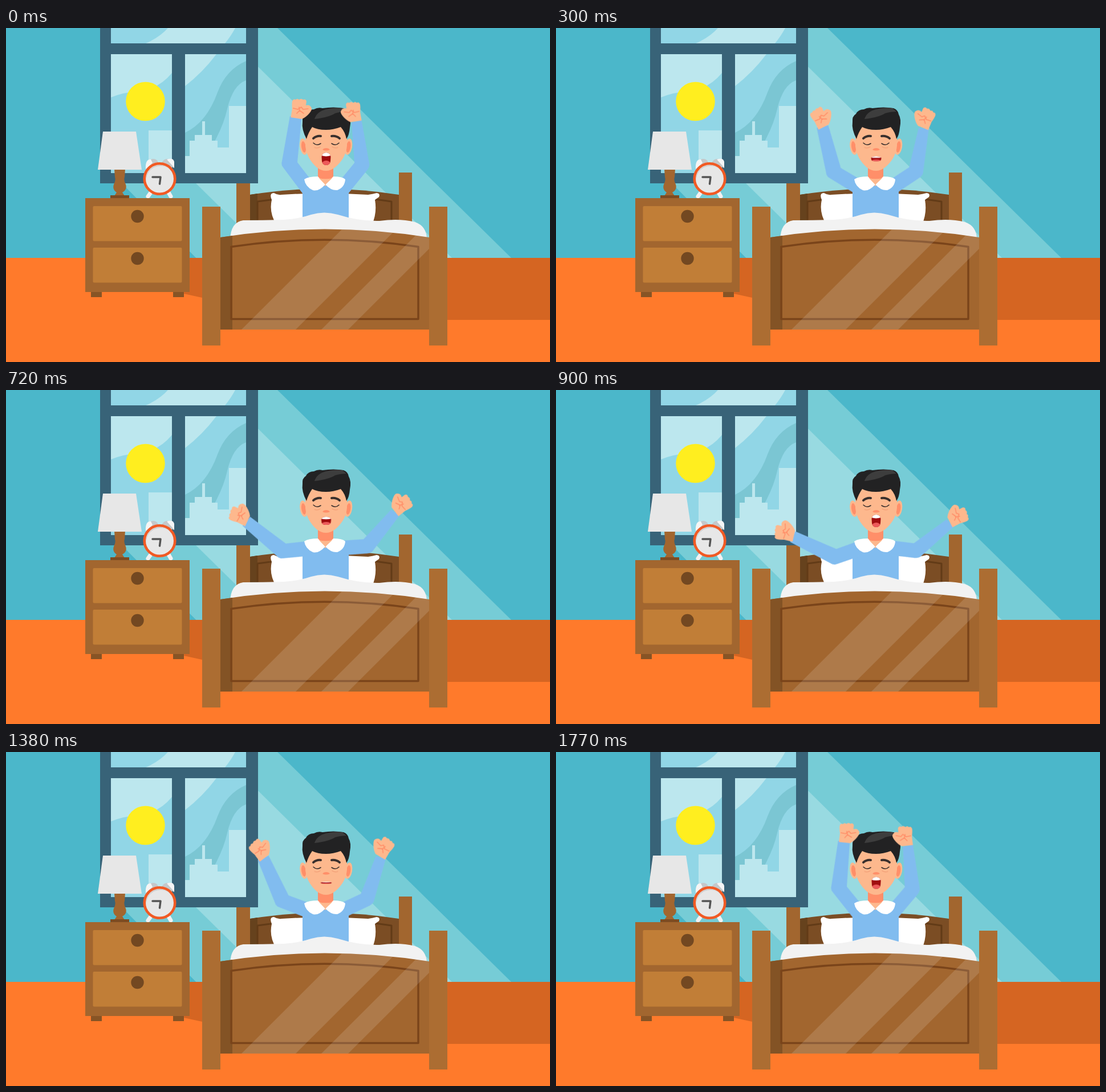
These frames come from a looping animation (954 by 587 pixels, 1800 ms). An HTML page:

```html
<!DOCTYPE html>
<html lang="en">
<head>
<meta charset="utf-8">
<title>Morning stretch</title>
<style>
  html, body { margin: 0; width: 100%; height: 100%; overflow: hidden; background: #4bb7ca; }
  svg { display: block; width: 100vw; height: 100vh; }

  .arm { animation: 900ms cubic-bezier(.3, .2, .7, .75) infinite alternate; }
  .left.arm { transform-origin: 531px 271px; animation-name: lower-left; }
  .right.arm { transform-origin: 590px 268px; animation-name: lower-right; }
  @keyframes lower-left { to { transform: rotate(-72.3deg); } }
  @keyframes lower-right { to { transform: rotate(58deg); } }

  .hand { transform-origin: 508px 157px; animation: bend 900ms linear infinite alternate; }
  @keyframes bend { 33%, 100% { transform: rotate(-14deg); } }

  .mouth { transform-origin: 561.5px 230px; animation: yawn 450ms linear infinite alternate; }
  @keyframes yawn { to { transform: scale(1.2, .1); } }

  .skin { fill: #fdb88d; }
  .blush { fill: #ff8f69; }
  .shirt { fill: #81bcef; }
  .wood { fill: #a2662f; }
  .post { fill: #ac6d32; }
  .drawer { fill: #c17e37; }
  .dark { fill: #734821; }
  .glass { fill: #91d6e6; }
  .glow { fill: #bce7ee; }
  .line { fill: none; stroke-linecap: round; stroke-linejoin: round; }
</style>
</head>
<body>
<svg viewBox="0 0 954 587" preserveAspectRatio="none">
  <defs>
    <clipPath id="front"><path d="M376 368Q559 339 742 368V530H376Z"/></clipPath>
    <clipPath id="pane"><path d="M314 46H421V255H314Z"/></clipPath>
    <clipPath id="lips"><path id="lip" d="M553.5 226Q555 219 561.5 219Q568 219 569.5 226L569 234Q568 241 561.5 241Q555 241 554 234Z"/></clipPath>
    <g id="fist">
      <path class="skin" d="M499.500 157L502 142Q501 130 503 127Q505 124 508 126Q511 123 514 126Q518 123 521 126Q526 124 527 129L526 136Q533 134 536 141Q537 144 532 150Q526 157 519 160Z"/>
      <path class="line" stroke="#ff8f69" stroke-width="1.6" d="M504 141L512 143L518 139L521 143L530 142M510 150L515 145L522 150M514 139L515 145"/>
    </g>
  </defs>

  <!-- Room -->
  <path fill="#4bb7ca" d="M0 0H954V404H0Z"/>
  <path fill="#76ccd6" d="M0 0H476L886 404H333L-70 0Z"/>
  <path fill="#4bb7ca" d="M0 0H165V273H203L333 404H0Z"/>
  <path fill="#98dae1" d="M333 273L441 67L782 404H466Z"/>
  <path fill="#ff7a2b" d="M0 404H954V587H0Z"/>
  <path fill="#d56522" d="M774 404H954V513H774ZM322 404H344V474L312 467Z"/>

  <!-- Headboard -->
  <path class="wood" d="M404 254H428V350H404ZM689 254H712V350H689Z"/>
  <path fill="#7b4d24" d="M428 293Q558 272 689 293V350H428Z"/>
  <path fill="#66421d" d="M428 293L441 291V350H428Z"/>
  <path class="line" stroke="#623b17" stroke-width="3" d="M441 350V305Q558 287 676 305V350"/>

  <!-- Window -->
  <path fill="#386378" d="M165 0H442V273H165Z"/>
  <path class="glass" d="M184 0H421V27H184ZM184 46H291V255H184ZM314 46H421V255H314Z"/>
  <path class="glow" d="M245 27Q270 16 284 0H402Q394 15 384 27ZM184 46H291V79Q268 107 234 111Q205 113 184 122ZM314 46H369Q345 78 314 102ZM250 180H291V255H250Z"/>
  <g clip-path="url(#pane)">
    <path fill="#7bc6d3" d="M421 58Q386 73 371 113Q352 166 314 184V255H330Q378 190 388 142Q398 100 421 92Z"/>
    <path class="glow" d="M314 255V225H322V198H331V188H344V164H349V188H361V198H371V210H391V137H421V255Z"/>
  </g>
  <circle cx="244.500" cy="129" r="34.300" fill="#ffee1f"/>

  <!-- Lamp -->
  <path class="wood" d="M190 248H209L208 262Q206 268 210 275Q213 284 204 289L208 295H190L194 289Q186 284 189 275Q193 268 191 262Z"/>
  <path fill="#7d4c22" d="M183 294H216V299H183Z"/>
  <path fill="#e7e7e7" d="M170 182H228L238 249H161Z"/>

  <!-- Alarm clock -->
  <path class="line" stroke="#f2f2f2" stroke-width="7" d="M254 289L249 296M285 289L289 296"/>
  <path fill="#c4c8ca" d="M246 246Q249 229 259 230Q266 231 267 237ZM273 237Q277 229 284 230Q294 232 295 246Z"/>
  <path fill="#f5f5f5" d="M245 248Q244 230 254 231L257 237ZM282 231Q293 227 295 235V246L291 241Z"/>
  <circle cx="269.500" cy="265" r="26.800" fill="#e7e7e7" stroke="#f15a24" stroke-width="4.600"/>
  <path fill="#c9c9c9" d="M246 270A24.400 24.400 0 0 1 288 249A25 25 0 0 0 246 270Z"/>
  <path class="line" stroke="#555" stroke-width="3.500" d="M257 262H271L269.500 274"/>

  <!-- Bedside cabinet -->
  <path fill="#875425" d="M149 463H168V473H149ZM293 463H312V473H293Z"/>
  <path class="wood" d="M139 299H322V464H139Z"/>
  <rect class="drawer" x="152.500" y="313" width="156" height="61.500" rx="2"/>
  <rect class="drawer" x="152.500" y="386" width="156" height="61.500" rx="2"/>
  <circle class="dark" cx="230.500" cy="331" r="11.200"/>
  <circle class="dark" cx="230.500" cy="405" r="11.200"/>

  <!-- Pillow -->
  <path fill="#fff" d="M466 302Q461 290 470 290Q476 294 483 293Q560 288 635 293Q643 292 650 290Q657 291 654 297L647 302Q651 325 642 345H474Q461 325 466 302Z"/>

  <!-- Sleeper -->
  <path class="shirt" d="M520 345V284Q521 270 541 263H579Q600 270 601 284V345Z"/>
  <path class="skin" d="M547 258H574V266L560 278L547 266Z"/>
  <path class="blush" d="M547 240H574V263Q560 268 547 263Z"/>
  <g class="skin">
    <ellipse cx="522" cy="208.500" rx="6.500" ry="14.500" transform="rotate(-9 522 208.500)"/>
    <ellipse cx="600.500" cy="208.500" rx="6.500" ry="14.500" transform="rotate(9 600.500 208.500)"/>
  </g>
  <g class="blush">
    <ellipse cx="522" cy="209" rx="3.800" ry="10" transform="rotate(-9 522 209)"/>
    <ellipse cx="600.500" cy="209" rx="3.800" ry="10" transform="rotate(9 600.500 209)"/>
  </g>
  <path class="skin" d="M525 170H598V207Q596 229 577 245Q561 257 545 245Q527 229 525 207Z"/>
  <path fill="#222223" d="M527 195Q518 178 520 165Q519 155 526 151Q530 143 540 143Q547 139 555 141Q575 138 592 141Q600 144 601 152Q606 160 603 175Q602 188 597 195Q595 183 587 174Q574 179 561 179Q546 179 537 174Q530 184 527 195Z"/>
  <path fill="#3d3d3d" d="M541 160Q545 147 561 143Q580 139 590 141L597 147Q586 147 577 150Q566 157 541 160Z"/>
  <g class="line" stroke="#3a302d">
    <path stroke-width="4" d="M539 194Q545 189 552 190M571 190Q579 189 585 194"/>
    <path stroke-width="1.600" d="M539 202Q545 208 552 203M571 203Q578 208 584 202"/>
  </g>
  <path class="line" stroke="#f3a078" stroke-width="1.200" d="M541 210Q546 212 551 209M572 209Q578 212 582 210"/>
  <path class="blush" d="M555 214Q557 211 561.500 211Q566 211 568 214Q561 217 555 214Z"/>
  <g class="mouth">
    <use href="#lip" fill="#a00d0f"/>
    <g clip-path="url(#lips)">
      <path fill="#fff" d="M553 218H570V224Q561 227 553 224Z"/>
      <ellipse cx="561.500" cy="240" rx="8" ry="7" fill="#ed5a5a"/>
    </g>
  </g>

  <g class="left arm">
    <path class="shirt" d="M498 155L518.500 158L511 236L541 275L524 296L486 245Q482 240 484 234Z"/>
    <g class="hand"><use href="#fist"/></g>
  </g>
  <g class="right arm">
    <path class="shirt" d="M623.500 162L606 166L611 237L580 275L597 295L634 249Q638 243 637 238Z"/>
    <g transform="translate(1123 5.500) scale(-1 1)"><g class="hand"><use href="#fist"/></g></g>
  </g>
  <path fill="#fff" d="M547 261L560 275L574 261Q590 261 595 266Q594 280 581 285Q570 286 560 275Q548 288 538 285Q525 279 523 266Q530 261 547 261Z"/>
  <path class="skin" d="M549 264Q560 267 572 264L560 275.500Z"/>

  <!-- Blanket and footboard -->
  <path fill="#f2f2f2" d="M393 372Q394 341 416 338Q450 338 487 337Q515 335 535 328Q558 321 582 328Q620 340 655 339Q690 334 717 341Q738 348 738 372Z"/>
  <g clip-path="url(#front)">
    <path class="wood" d="M376 340H742V530H376Z"/>
    <path fill="#835325" d="M376 340H397V530H376Z"/>
    <path class="line" stroke="#7a441a" stroke-width="3.500" d="M395 384.500Q559 360 723 384.500V511.500H395Z"/>
    <path fill="#fff" fill-opacity=".13" d="M413 530L593 350H688L508 530ZM553 530L733 350H780L600 530Z"/>
  </g>
  <path class="post" d="M344 314H376V558H344ZM742 314H774V558H742Z"/>
</svg>
</body>
</html>
```
